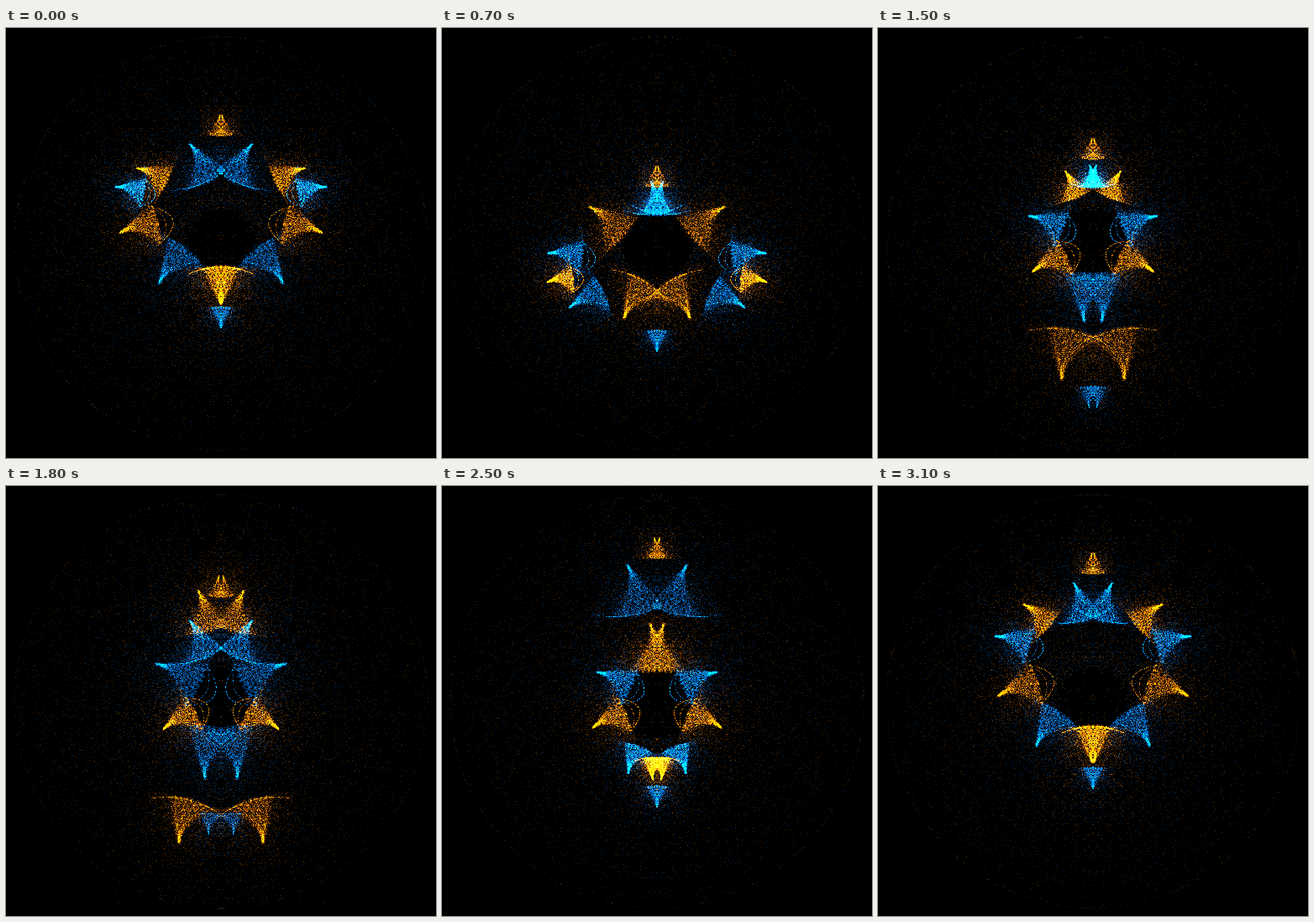
These frames come from a looping animation (512 px wide and 512 px high, 3.2 s). An HTML page with a canvas:

```html
<!DOCTYPE html>
<html lang="en">
<head>
<meta charset="utf-8">
<title>Mirrored root cloud</title>
<style>
html, body { margin: 0; width: 100%; height: 100%; overflow: hidden; background: #000; }
canvas { display: block; width: 512px; height: 512px; }
</style>
</head>
<body>
<canvas id="stage" width="512" height="512"></canvas>
<script>
const SIZE = 512, LOOP = 3200, STEP = 100, WINGS = 8;
const ctx = document.getElementById('stage').getContext('2d');
const image = ctx.createImageData(SIZE, SIZE);
const pixels = image.data;
const ORANGE = [1, 0.5, 0], BLUE = [0, 0.5, 1];

let seed = 20177;
function random() {
  seed = (seed + 0x6D2B79F5) | 0;
  let n = Math.imul(seed ^ (seed >>> 15), 1 | seed);
  n = (n + Math.imul(n ^ (n >>> 7), 61 | n)) ^ n;
  return ((n ^ (n >>> 14)) >>> 0) / 4294967296;
}
const normal = () => random() + random() + random() + random() - 2;
const signed = () => random() * 2 - 1;

// Wing centres x, y from top to bottom over half the loop.
const pose = (time, ...centres) => ({ time, centres });
const half = [
  pose(700, 256, 180, 250, 208, 200, 236, 152, 272, 145, 300, 178, 321, 235, 318, 256, 368),
  pose(800, 256, 172, 256, 213, 204, 234, 165, 275, 152, 318, 178, 334, 232, 345, 256, 393),
  pose(1100, 256, 164, 252, 205, 213, 216, 188, 262, 192, 328, 222, 382, 252, 400, 256, 453),
  pose(1500, 256, 147, 252, 180, 230, 191, 205, 235, 210, 278, 250, 312, 228, 380, 252, 435),
  pose(1900, 256, 117, 222, 185, 236, 152, 212, 229, 212, 278, 242, 315, 214, 388, 242, 388)
];

// The other half runs backwards, upside down, with the wing order reversed.
const flip = ({ time, centres }) => ({
  time: (800 - time + LOOP) % LOOP,
  centres: centres.map((_, k) => {
    const from = (WINGS - 1 - (k >> 1)) * 2 + k % 2;
    return k % 2 ? SIZE - centres[from] : centres[from];
  })
});
const keys = [...half, ...half.map(flip)].sort((a, b) => a.time - b.time);

function keyAt(i) {
  const n = keys.length, turn = Math.floor(i / n), key = keys[i - turn * n];
  return { time: key.time + turn * LOOP, centres: key.centres };
}

function centresAt(time) {
  let i = -1;
  while (keyAt(i + 1).time <= time) i++;
  const [before, a, b, after] = [i - 1, i, i + 1, i + 2].map(keyAt);
  const span = b.time - a.time, u = (time - a.time) / span;
  const u2 = u * u, u3 = u2 * u;
  const values = a.centres.map((p, k) => {
    const q = b.centres[k];
    const m = (q - before.centres[k]) / (b.time - before.time) * span;
    const n = (after.centres[k] - p) / (after.time - a.time) * span;
    return (2 * u3 - 3 * u2 + 1) * p + (u3 - 2 * u2 + u) * m + (3 * u2 - 2 * u3) * q + (u3 - u2) * n;
  });
  return Array.from({ length: WINGS }, (_, w) => ({ x: values[w * 2], y: values[w * 2 + 1] }));
}

// Points are across, outward and light, in units of the wing radius.
const isTip = index => index === 0 || index === WINGS - 1;
function makeWing(index) {
  const tip = isTip(index);
  const points = [];
  const add = (across, out, light) => points.push({ across, out, light });
  for (let i = 0; i < (tip ? 260 : 1250); i++) {
    const u = random() ** 1.35;
    let s = signed();
    if (random() < 0.55) s = Math.round(s * 4) / 4 + normal() * 0.02;
    const width = 0.9 * (1 - u) ** 1.4;
    add(s * width + 0.18 * Math.sin(u * 3) + normal() * 0.05,
        -0.55 + 1.75 * u - 0.12 * (1 - s * s) * (1 - u) + normal() * 0.05, 95);
  }
  for (let i = 0; i < (tip ? 300 : 1150); i++) {
    const out = -Math.log(1 - random() * 0.995) * 0.95 - 0.6;
    add(normal() * (1.2 + 0.35 * Math.abs(out)), random() < 0.07 ? -out : out, 72);
  }
  const side = index === 3 || index === 4, arch = index === 1 || index === 6;
  for (let i = 0; i < 130 && (side || arch); i++) {
    const s = signed();
    if (side) add(s * 0.9, -0.5 - (random() < 0.65 ? 0.85 : 0.5) * (1 - s * s), 115);
    else add(s * 1.6, -0.62 + 0.35 * s * s, 115);
  }
  return { points, color: index % 2 ? BLUE : ORANGE };
}
const wings = Array.from({ length: WINGS }, (_, i) => makeWing(i));

const dust = Array.from({ length: 4200 }, () => ({
  angle: random() * Math.PI * 2,
  radius: 45 + 200 * random() ** 1.25,
  phase: random() * Math.PI * 2,
  color: random() < 0.5 ? ORANGE : BLUE
}));

function plot(x, y, color, light) {
  x = Math.round(x);
  y = Math.round(y);
  if (x < 0 || x >= SIZE || y < 0 || y >= SIZE) return;
  const i = (y * SIZE + x) * 4;
  for (let c = 0; c < 3; c++) pixels[i + c] += color[c] * light;
}

function plotPair(x, y, color, light) {
  plot(x, y, color, light);
  plot(SIZE - 1 - x, y, color, light);
}

const gap = (a, b) => Math.hypot(a.x - b.x, a.y - b.y);

function draw(time) {
  new Uint32Array(pixels.buffer).fill(0xff000000);
  const turn = time / LOOP * Math.PI * 2;
  for (const { angle, radius, phase, color } of dust) {
    const a = angle + 0.3 * Math.sin(turn + phase);
    const r = Math.min(246, radius * (1 + 0.12 * Math.cos(turn + phase)));
    plotPair(256 + r * Math.cos(a), 256 + r * Math.sin(a), color, 55);
  }
  const centres = centresAt(time);
  const middle = (centres[3].y + centres[4].y) / 2;
  wings.forEach(({ points, color }, i) => {
    const { x, y } = centres[i];
    const r = isTip(i) ? 14 : (gap(centres[i], centres[i - 1]) + gap(centres[i], centres[i + 1])) / 4;
    const angle = Math.atan2(y - middle, x - 256);
    const dx = Math.cos(angle) * r, dy = Math.sin(angle) * r;
    for (const { across, out, light } of points) {
      plotPair(x + dx * out - dy * across, y + dy * out + dx * across, color, light);
    }
  });
  ctx.putImageData(image, 0, 0);
}

let shown = -1;
const start = performance.now();
function tick() {
  const step = Math.floor(((performance.now() - start) % LOOP) / STEP);
  if (step !== shown) draw((shown = step) * STEP);
  requestAnimationFrame(tick);
}
tick();
</script>
</body>
</html>
```
